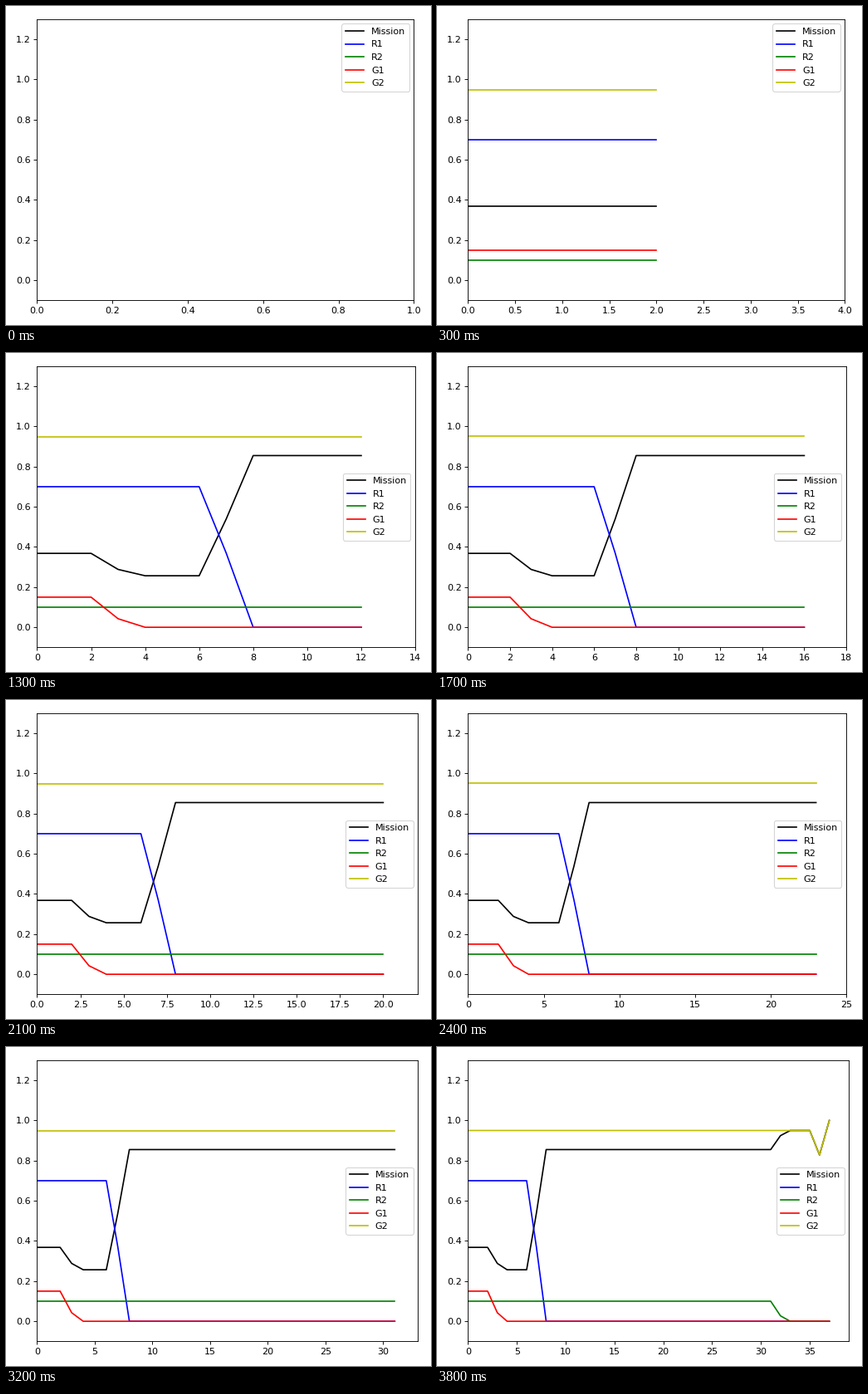
Write a matplotlib script that moves like this. It is 512 px wide and 384 px high and loops after 3900 ms.

```python
import numpy as np
import matplotlib.pyplot as plt
from matplotlib.animation import FuncAnimation

STEPS = 39
t = np.arange(STEPS - 1)


def series(times, values):
    """Piecewise linear state, held constant outside the given times."""
    return np.interp(t, times, values)


r1 = series([6, 7, 8], [0.7, 0.37, 0])
r2 = series([31, 32, 33], [0.1, 0.027, 0])
g1 = series([2, 3, 4], [0.15, 0.0425, 0])
g2 = series([35, 36, 37], [0.95, 0.828, 1])

# Success through G2 while both risks are avoided, or directly through G1
mission = 1 - (1 - g1) * (1 - g2 * (1 - r1) * (1 - r2))

curves = [
    ("Mission", mission, "k"),
    ("R1", r1, "b"),
    ("R2", r2, "g"),
    ("G1", g1, "r"),
    ("G2", g2, "y"),
]

fig, ax = plt.subplots(figsize=(6.4, 4.8), dpi=80, layout="tight")
fig.get_layout_engine().set(pad=1.07)
ax.set_ylim(-0.1, 1.3)
lines = [ax.plot([], [], color, label=name)[0] for name, _, color in curves]

# Invisible corner marker: keeps a tick length free above and to the right
ax.plot(1, 1, "s", markersize=7.2, alpha=0, transform=ax.transAxes, clip_on=False)
ax.legend(loc="best")


def update(step):
    for line, (_, values, _) in zip(lines, curves):
        line.set_data(t[:step], values[:step])
    ax.set_xlim(0, step + 1)
    return lines


anim = FuncAnimation(fig, update, frames=STEPS, interval=100, repeat=True)
plt.show()
```
